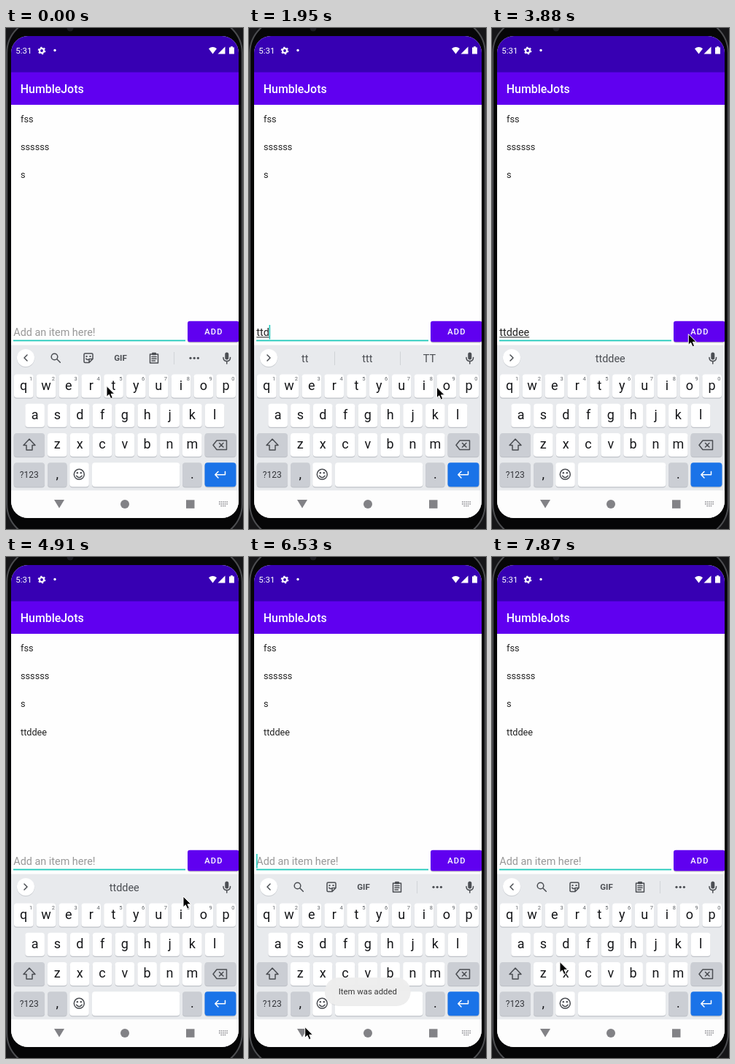
These frames come from a looping animation (325 by 685 pixels, 8000 ms). An HTML page:

```html
<!DOCTYPE html>
<html lang="en">
<head>
<meta charset="utf-8">
<title>Todo list</title>
<style>
  html, body { margin: 0; width: 100%; height: 100%; overflow: hidden; background: #000; }
  svg { display: block; width: 325px; height: 685px; font-family: Roboto, sans-serif; }
  .mid { text-anchor: middle; }
  .line { fill: none; stroke: #4b4e53; stroke-width: 1.5; stroke-linejoin: round; stroke-linecap: round; }
  .dark { fill: #4b4e53; }
  .key { font-size: 18px; fill: #16171a; }
  .hintDigit { font-size: 7.5px; fill: #5f6368; }
  .field { font-size: 14.4px; fill: #222; }
  .item { font-size: 12.7px; fill: #222; }
  .suggest { font-size: 14.4px; fill: #4b4e53; }
</style>
</head>
<body>
<svg viewBox="0 0 325 685">
  <defs>
    <clipPath id="screen">
      <rect x="7" y="11" width="312" height="659" rx="23"/>
    </clipPath>
  </defs>

  <rect width="325" height="685" fill="#161618"/>
  <rect x="1.200" y="-12" width="322.600" height="709" rx="46" fill="#060607" stroke="#4c4d50" stroke-width="2"/>
  <circle cx="88" cy="0" r="4.500" fill="#1c1c22"/>

  <g clip-path="url(#screen)">
    <rect x="7" y="11" width="312" height="659" fill="#fefefe"/>
    <rect x="7" y="11" width="312" height="50" fill="#3700b3"/>
    <rect x="7" y="60.500" width="312" height="44.500" fill="#6000f0"/>

    <g fill="#fff">
      <text x="13.300" y="35" font-size="11.500">5:31</text>
      <circle cx="49" cy="31" r="3" fill="none" stroke="#fff" stroke-width="2.200"/>
      <circle cx="49" cy="31" r="4.700" fill="none" stroke="#fff" stroke-width="1.300" stroke-dasharray="2.4 2.52"/>
      <circle cx="67" cy="30.500" r="1.700"/>
      <path d="M278 28.200Q283.500 24 289 28.200L283.500 35.500Z"/>
      <path d="M300.500 25.500V35.500H290.500Z"/>
      <path d="M306 26.500H308V25.300H311V26.500H313V35.500H306Z"/>
      <text x="19.800" y="89" font-size="15.900" font-weight="500">HumbleJots</text>
    </g>

    <g class="item">
      <text x="20" y="129">fss</text>
      <text x="20" y="167.200">ssssss</text>
      <text x="20" y="205.400">s</text>
      <text x="20" y="243.600" id="added">ttddee</text>
    </g>

    <text class="field" id="hint" x="10.300" y="421" style="fill:#989898">Add an item here!</text>
    <text class="field" id="typed" x="10.300" y="421"></text>
    <rect id="under" x="10.300" y="422.300" height="1" fill="#222"/>
    <rect id="caret" y="406" width="1.600" height="19.500" fill="#20c9bb"/>
    <rect x="10" y="426.500" width="236" height="1.800" fill="#20c9bb"/>

    <g id="button">
      <rect id="buttonShadow" x="249" y="402.500" width="70.500" height="28" rx="3" fill="#000" opacity=".22"/>
      <rect id="buttonFace" x="249" y="400.800" width="70.500" height="28.500" rx="3"/>
      <text x="272.200" y="419" font-size="11.100" font-weight="500" letter-spacing="1.200" fill="#fff">ADD</text>
    </g>

    <rect x="7" y="433.500" width="312" height="199" fill="#e8eaed"/>
    <rect x="7" y="632.500" width="312" height="38" fill="#fdfdfd"/>

    <circle cx="27" cy="451.800" r="12.200" fill="#c9ccd1"/>
    <circle cx="27" cy="451" r="12" fill="#fff"/>
    <path id="chevron" class="line"/>

    <g id="tools">
      <circle class="line" cx="66.500" cy="449.500" r="4.300"/>
      <path class="line" d="M69.800 452.800L74.300 457.300"/>
      <path class="line" d="M108.500 445H117.500Q119 445 119 446.500V452.500L114 457.500H108.500Q107 457.500 107 456V446.500Q107 445 108.500 445ZM114 457V452.500H118.500M109.800 452Q111.500 454.500 113.500 453"/>
      <path class="dark" d="M109.500 448h2v2h-2zM114.500 448h2v2h-2z"/>
      <text class="mid dark" x="157" y="455" font-size="11.500" font-weight="700">GIF</text>
      <path class="line" d="M197.500 446H208.500V458H197.500ZM200 449.500H206M200 452.300H206M200 455H204.500"/>
      <rect class="dark" x="200" y="443.800" width="6" height="3.500" rx="1"/>
      <path d="M230.500 443V460" stroke="#d2d5d9"/>
      <g class="dark"><circle cx="253" cy="451.300" r="1.600"/><circle cx="258.200" cy="451.300" r="1.600"/><circle cx="263.400" cy="451.300" r="1.600"/></g>
    </g>

    <g id="suggestions" class="suggest mid">
      <text x="76.700" y="457"></text>
      <text x="162.300" y="457"></text>
      <text x="247.400" y="457"></text>
      <path id="dividers" d="M117.500 442.500V461M207.500 442.500V461" stroke="#cfd2d6"/>
    </g>

    <rect class="dark" x="300.300" y="443.500" width="5" height="10" rx="2.500"/>
    <path class="line" d="M298 450.500Q298 455.500 302.800 455.500T307.600 450.500M302.800 455.500V459"/>

    <g id="keys"></g>

    <path class="line" d="M32 562L40 570.500H36V577H28V570.500H24Z"/>
    <path class="line" d="M289 564H302.500V576.500H289L284 570.200ZM292.500 567.500L298 573M298 567.500L292.500 573"/>
    <circle class="line" cx="100.300" cy="610.300" r="7"/>
    <g class="dark"><circle cx="97.800" cy="608.300" r="1.200"/><circle cx="102.800" cy="608.300" r="1.200"/></g>
    <path class="line" d="M96.500 612.300Q100.300 617 104.100 612.300"/>
    <path class="line" style="stroke:#fff" d="M300.500 606.500V610.800H287M291 606.500L286.800 610.800L291 615"/>

    <g fill="#828286">
      <path d="M66 645H80L73 656.500Z"/>
      <circle cx="163" cy="651" r="6"/>
      <rect x="247" y="645.300" width="11.500" height="11.500"/>
    </g>
    <path d="M292 648H304M292 650.700H304M294.500 653.500H301.500" stroke="#85858a" stroke-width="1.500" stroke-dasharray="1.500 1.100"/>

    <g id="toast">
      <rect x="104" y="576" width="117.500" height="38" rx="19" fill="#000" opacity=".08"/>
      <rect x="104" y="575" width="117.500" height="38" rx="19" fill="#eee"/>
      <text class="mid" x="162.800" y="598" font-size="11.300" fill="#333">Item was added</text>
    </g>
  </g>

  <path id="cursor" d="M0 0V14.800L3.300 11.700L5.700 17.200L8.300 16.100L6 10.800H10.800Z" fill="#000" stroke="#fff" stroke-width="1" stroke-linejoin="round"/>
</svg>

<script>
const LOOP = 8000;
const $ = id => document.getElementById(id);
const svgNS = "http://www.w3.org/2000/svg";

function add(tag, attrs, text = "") {
  const el = document.createElementNS(svgNS, tag);
  for (const name in attrs) el.setAttribute(name, attrs[name]);
  el.textContent = text;
  $("keys").append(el);
}

function keyCap(x, y, width, fill = "#fff", height = 32) {
  const box = { x, width, height, rx: 4 };
  add("rect", { ...box, y: y + 1.2, fill: "#bfc2c8" });
  add("rect", { ...box, y, fill });
}

function keyRow(letters, firstX, y) {
  [...letters].forEach((letter, i) => {
    const x = firstX + i * 30.83;
    keyCap(x - 13.3, y, 26.6);
    add("text", { x, y: y + 21.4, class: "key mid" }, letter);
    if (y < 500) add("text", { x: x + 9.8, y: 482, class: "hintDigit mid" }, (i + 1) % 10);
  });
}

const gray = "#cbced4";
keyRow("qwertyuiop", 24.2, 473.5);
keyRow("asdfghjkl", 39.6, 513.8);
keyRow("zxcvbnm", 70.3, 554);
keyCap(10.7, 554, 42.3, gray);
keyCap(272.5, 554, 43, gray);
keyCap(10.7, 594.3, 42.3, gray, 33);
keyCap(57, 594.3, 26.6, gray, 33);
keyCap(87.2, 594.3, 26.6, "#fff", 33);
keyCap(118, 594.3, 120.3, "#fff", 33);
keyCap(242, 594.3, 26.6, gray, 33);
keyCap(272.5, 594.3, 43, "#1a73e8", 33);
add("text", { x: 31.8, y: 615, class: "mid", "font-size": 12, fill: "#33353a" }, "?123");
add("text", { x: 70.3, y: 616, class: "key mid" }, ",");
add("text", { x: 255.3, y: 616, class: "key mid" }, ".");

// Each track holds [start time, value...]; the value stays until the next entry.
const tracks = {
  typed: [[0, ""], [150, "t"], [750, "tt"], [1950, "ttd"], [2100, "ttdd"],
          [2690, "ttdde"], [2830, "ttddee"], [4470, ""]],
  underlined: [[0, 9], [2830, 5], [3130, 9]],
  caret: [[0, 0], [150, 1], [1350, 0], [1950, 1], [3880, 0], [5060, 1], [5500, 0],
          [6090, 1], [6680, 0], [7130, 1], [7580, 0]],
  bar: [[0], [450, "t", "thanks", "thank"], [1050, "tt", "ttt", "TT"], [2240, "", "ttd", ""],
        [2390, "", "ttdd", ""], [3130, "", "ttddee", ""], [5640]],
  pressed: [[0, 0], [4180, 1], [4470, 0]],
  toast: [[0, 0], [5060, .5], [5210, .97], [6830, .5], [6980, 0]],
  cursor: [[0, 138, 489.5], [750, 144, 493], [900, 151.5, 496], [1050, 182, 501], [1200, 224, 498],
           [1350, 257.5, 491], [3280, 284, 440], [3430, 276, 394], [3580, 269.3, 418.5],
           [4760, 262, 435], [4910, 243, 464], [5060, 224, 520], [5210, 196, 590],
           [5350, 166, 645], [5500, 137, 670], [5640, 120, 674], [5790, 105, 671], [5940, 92, 664],
           [6090, 84, 656], [6230, 79, 648], [6380, 76.7, 642.5], [6830, 79, 638], [6980, 83, 620],
           [7130, 87, 598], [7280, 91, 575], [7430, 93, 561], [7580, 93, 553.5]]
};

const valueAt = (name, t) => tracks[name].findLast(entry => entry[0] <= t).slice(1);
const show = (id, visible) => $(id).style.display = visible ? "" : "none";
const words = [...document.querySelectorAll("#suggestions text")];

function draw(t) {
  const [text] = valueAt("typed", t);
  const bar = valueAt("bar", t);
  const [pressed] = valueAt("pressed", t);
  const typed = $("typed");

  typed.textContent = text;
  const marked = Math.min(text.length, valueAt("underlined", t)[0]);
  $("under").setAttribute("width", marked ? typed.getSubStringLength(0, marked) : 0);
  $("caret").setAttribute("x", text ? 10 + typed.getComputedTextLength() : 10);
  show("caret", valueAt("caret", t)[0]);
  show("hint", !text);
  show("added", t >= 4470);

  show("tools", !bar.length);
  show("suggestions", bar.length);
  show("dividers", bar[0]);
  words.forEach((word, i) => word.textContent = bar[i] || "");
  $("chevron").setAttribute("d", bar.length ? "M25 447L29 451L25 455" : "M29 447L25 451L29 455");

  $("buttonFace").setAttribute("fill", pressed ? "#7b2cf1" : "#6000f0");
  $("buttonShadow").setAttribute("height", pressed ? 31 : 28);
  $("toast").style.opacity = valueAt("toast", t)[0];
  $("cursor").setAttribute("transform", `translate(${valueAt("cursor", t)})`);
}

const start = performance.now();
function tick() {
  draw((performance.now() - start) % LOOP);
  requestAnimationFrame(tick);
}
tick();
</script>
</body>
</html>
```
